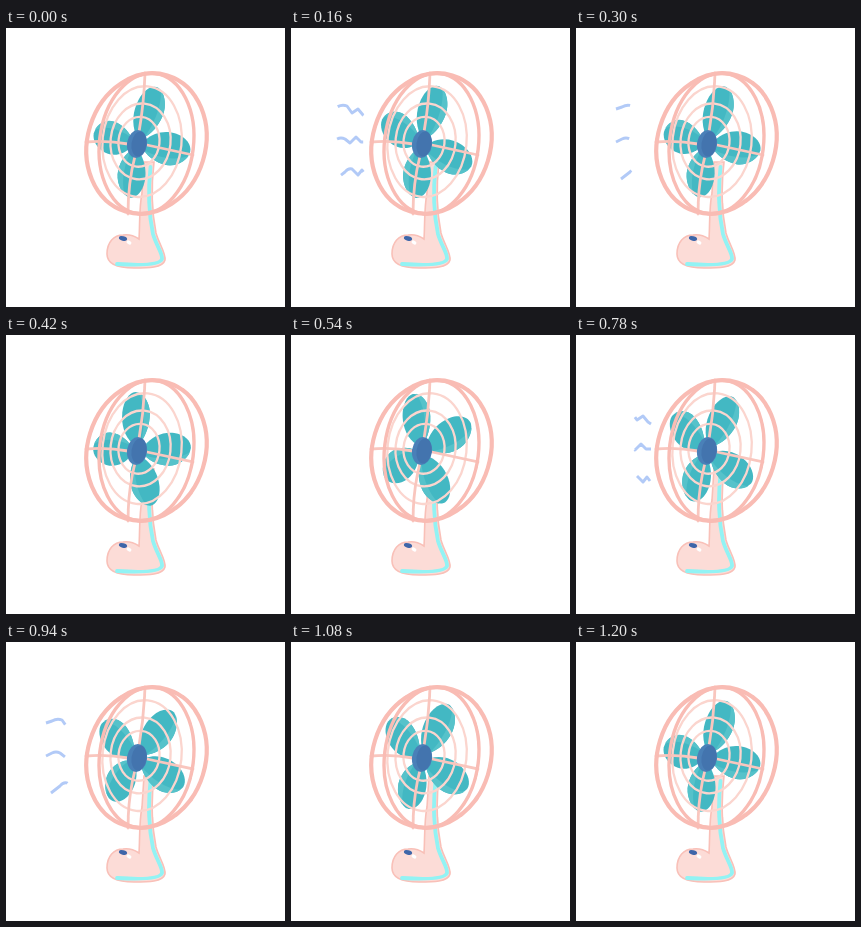
These frames come from a looping animation (279x279 px, 1.22 s). An HTML page:

```html
<!DOCTYPE html>
<html lang="en">
<head>
<meta charset="utf-8">
<title>Desk fan</title>
<style>
  @property --turn { syntax: "<angle>"; inherits: true; initial-value: 0deg; }

  html, body { margin: 0; width: 100%; height: 100%; overflow: hidden; background: #fff; }
  svg { display: block; width: 100vw; height: 100vh; }
  .cage { fill: none; stroke: #f9bcb4; stroke-width: 4.2; }
  .inner { stroke-width: 3.4; }
  .wire { fill: none; stroke: #fbd5ce; stroke-width: 2.3; }
  .spoke { fill: none; stroke: #f9c6be; stroke-width: 2.8; stroke-linecap: round; }
  .wind { fill: none; stroke: #b2caf7; stroke-width: 2.9; stroke-linejoin: round; }
  .wind path { animation: gust 1220ms linear infinite; }
  .rotor { animation: spin 1220ms infinite; }

  /* blades lean back from the hub, so each is a tilted, coned rotation */
  .rotor use {
    --a: calc(var(--turn) + var(--at));
    transform: matrix(
      calc(.85 * cos(var(--a))), calc(sin(var(--a))),
      calc(-.85 * sin(var(--a)) - .088), calc(cos(var(--a)) + .035),
      131, 116);
  }

  /* two turns in 1200 ms, then a short hold */
  @keyframes spin {
    0% { --turn: 0deg; animation-timing-function: steps(60, end); }
    98.36%, 100% { --turn: 720deg; }
  }
  /* each gust is drawn from the cage outwards, then erased the same way */
  @keyframes gust {
    0%, .82%, 56.56% { stroke-dasharray: 0 0 0 200; }
    11.89%, 67.62% { stroke-dasharray: 0 0 75 200; }
    15.57%, 71.31% { stroke-dasharray: 0 19 81 200; }
    31.15%, 86.89% { stroke-dasharray: 0 100 0 200; }
    31.16%, 86.9%, 100% { stroke-dasharray: 0 0 0 200; }
  }
</style>
</head>
<body>
<svg viewBox="0 0 279 279">
  <defs>
    <g id="blade">
      <path fill="#43b8c3" d="M-5-8C-14-16-18-28-16-40C-14-51-7-58 0-57.500C9-56 17-45 16.500-34C16-23 11-14 5-8Z"/>
      <path fill="#56c2ca" d="M4-56.500C11-53 17-44 16.500-34C16-23 11-14 5-8C10-22 12-42 4-56.500Z"/>
    </g>
  </defs>

  <g class="wind">
    <path pathLength="100" d="M75 89L72 87L67 81L61 85L56 78Q51 76 46 79L40 81"/>
    <path pathLength="100" d="M75 114L70 114L65 109L59 115L54 111Q50 109 46 111L40 114"/>
    <path pathLength="100" d="M74 146L71 142L67 147L61 141Q57 140 54 144L45 151"/>
  </g>

  <path fill="#fcdcd7" stroke="#f9c0b8" stroke-width="1.6" d="M138 134L148 134C145 160 146 185 150 205C153 216 160 225 159 232C157 240 142 240 128 240C112 240 101 236 101 226C101 214 108 207 117 207C124 206 130 209 133 211C134 196 133 180 136 165Z"/>
  <path fill="none" stroke="#92f3f4" stroke-width="3.8" stroke-linecap="round" d="M144.500 139C142 162 143 187 147 206C150 217 157 226 156 231C154 237 134 237.500 111 236"/>
  <ellipse cx="117" cy="210.500" rx="4.200" ry="2.200" fill="#3e66a9" transform="rotate(14 117 210.500)"/>
  <ellipse cx="123" cy="214.500" rx="2.600" ry="1.800" fill="#fff" transform="rotate(30 123 214.500)"/>

  <g class="rotor">
    <use href="#blade" style="--at: 19deg"/>
    <use href="#blade" style="--at: 100deg"/>
    <use href="#blade" style="--at: 197deg"/>
    <use href="#blade" style="--at: 278.5deg"/>
  </g>

  <g transform="rotate(6 135 114)">
    <ellipse class="wire" cx="136" cy="113.500" rx="39.500" ry="55.500"/>
    <ellipse class="wire" cx="134.500" cy="113.500" rx="30" ry="38"/>
    <ellipse class="wire" cx="133" cy="114" rx="20.500" ry="25"/>
  </g>
  <path class="spoke" d="M139 45Q138 75 133 104M129 128Q122 155 122 186M80 114Q101 112 122 116M141 117Q164 122 187 127"/>
  <ellipse cx="131" cy="116" rx="10" ry="14" fill="#4a80b8" transform="rotate(8 131 116)"/>
  <ellipse cx="133" cy="116" rx="7.500" ry="12.500" fill="#4374ae" transform="rotate(8 133 116)"/>
  <ellipse class="cage inner" cx="140.500" cy="115.500" rx="47" ry="70.500" transform="rotate(7 140.500 115.500)"/>
  <ellipse class="cage" cx="140.500" cy="115.500" rx="59" ry="71.200" transform="rotate(17 140.500 115.500)"/>
</svg>
</body>
</html>
```
